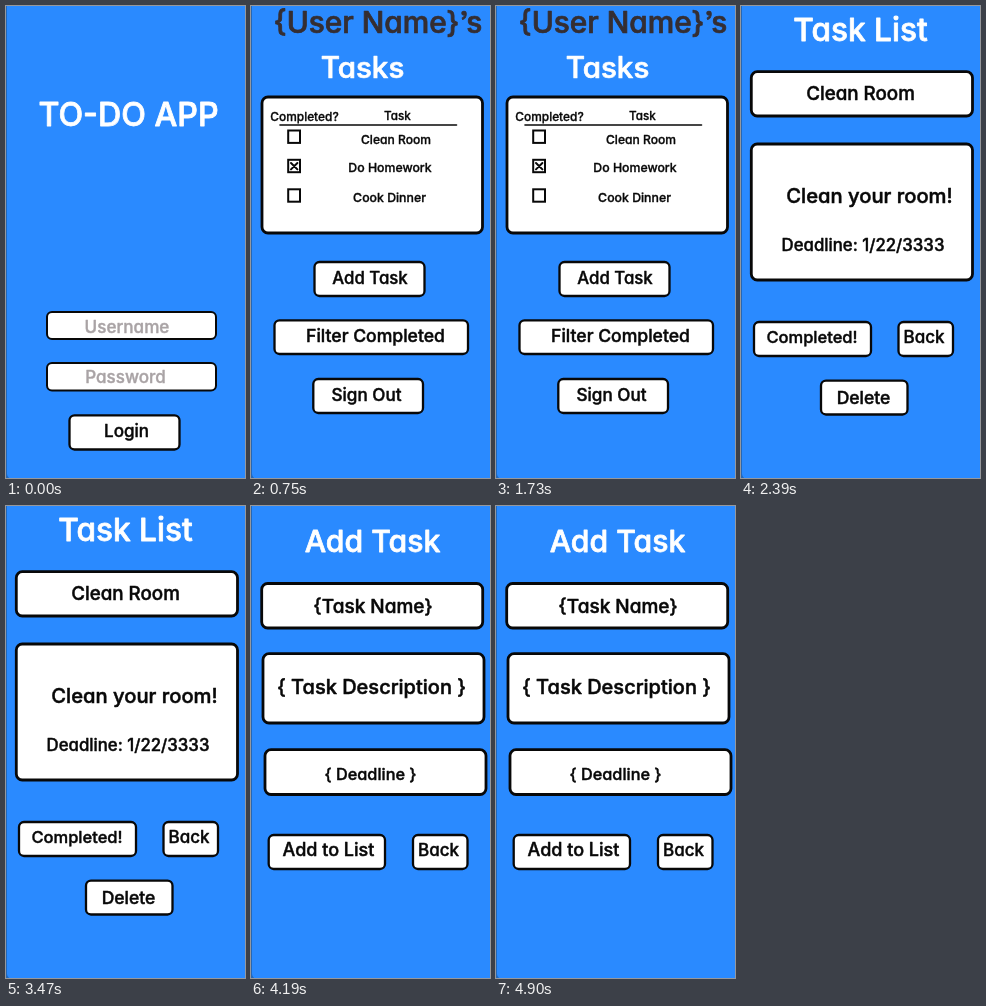
Animation of 239x472 px, one loop 5380 ms. Source, as an HTML page:

```html
<!DOCTYPE html>
<html lang="en">
<head>
<meta charset="utf-8">
<title>To-do app</title>
<style>
  html, body { margin: 0; width: 100%; height: 100%; overflow: hidden; background: #2a8aff; }
  svg { display: block; width: 239px; height: 472px; }
  text {
    font-family: Inter, "Noto Sans", sans-serif;
    font-weight: 500;
    font-feature-settings: "cv11", "ss03";
    text-anchor: middle;
    white-space: pre;
    stroke-linejoin: round;
  }
</style>
</head>
<body>
<svg id="stage" viewBox="0 0 239 472"></svg>
<script>
const INK = "#080808", WHITE = "#fff", GREY = "#a9a3a5", BROWN = "#352e32";
const LOOP = 5380;
const stage = document.getElementById("stage");

function add(parent, tag, attrs, content = "") {
  const node = document.createElementNS("http://www.w3.org/2000/svg", tag);
  for (const key in attrs) node.setAttribute(key, attrs[key]);
  node.textContent = content;
  parent.append(node);
  return node;
}

// Boxes are given by the centre lines of their edges.
const box = (x1, y1, x2, y2, line = 2, r = 5) => g => add(g, "rect", {
  x: x1, y: y1, width: x2 - x1, height: y2 - y1, rx: r,
  fill: WHITE, stroke: INK, "stroke-width": line
});
const card = (x1, y1, x2, y2) => box(x1, y1, x2, y2, 2.8, 6);
const label = (content, x, y, size, color = INK) => g => add(g, "text", {
  x, y, "font-size": size, fill: color, stroke: color, "stroke-width": size * 0.025
}, content);
const stroke = (d, width) => g => add(g, "path", {
  d, fill: "none", stroke: INK, "stroke-width": width, "stroke-linecap": "round"
});
const check = y => box(37.2, y, 49, y + 12.4, 2, 0);

const screens = [
  { start: 0, parts: [
    label("TO-DO APP", 122.5, 119.5, 32.2, WHITE),
    box(41, 306, 210, 333),
    label("Username", 121, 327, 17.1, GREY),
    box(41, 357, 210, 384.5),
    label("Password", 119.5, 377, 17, GREY),
    box(63.5, 409.3, 173.5, 443.5, 2.3),
    label("Login", 120.5, 430.5, 17)
  ] },
  { start: 750, parts: [
    label("{User Name}’s", 127, 27, 29.8, BROWN),
    label("Tasks", 111.5, 72, 29.6, WHITE),
    card(11, 91, 231.5, 227),
    label("Completed?", 53.5, 114.5, 11.9),
    label("Task", 146.5, 113.5, 11.7),
    stroke("M29 119H205.5", 1.6),
    check(124.5), check(153.8), check(183.3),
    stroke("M40 157L46.4 163.4M46.4 157L40 163.4", 2),
    label("Clean Room", 145, 138, 12.1),
    label("Do Homework", 139, 166, 12.3),
    label("Cook Dinner", 138.5, 195.5, 12.3),
    box(63.5, 256, 173.5, 290, 2.3),
    label("Add Task", 119, 277.5, 16.8),
    box(23.5, 314.3, 217, 348, 2.3),
    label("Filter Completed", 124.5, 335.5, 17.6),
    box(62.3, 373, 172, 407, 2.3),
    label("Sign Out", 115.5, 394.5, 17.1)
  ] },
  { start: 2390, parts: [
    label("Task List", 119.5, 34.5, 31.6, WHITE),
    card(10.3, 65.7, 231.5, 110),
    label("Clean Room", 119.5, 94, 18.8),
    card(10.3, 138, 231.5, 274),
    label("Clean your room!", 128.5, 197, 20.2),
    label("Deadline: 1/22/3333", 122, 244.5, 16.8),
    box(13, 316, 130, 350, 2.3),
    label("Completed!", 71, 337, 16.5),
    box(157.5, 316, 212, 350, 2.3),
    label("Back", 183, 337, 17),
    box(80, 374.7, 166.5, 408.5, 2.3),
    label("Delete", 122.5, 397.5, 17.5)
  ] },
  { start: 4190, parts: [
    label("Add Task", 121.5, 46, 30.2, WHITE),
    card(10.7, 77.5, 231.7, 122),
    label("{Task Name}", 122, 107, 19),
    card(12, 147.7, 233, 217),
    label("{ Task Description }", 120.5, 188, 20),
    card(14, 243.7, 235, 288.5),
    label("{ Deadline }", 119.5, 273.5, 16.3),
    box(17.7, 329, 134, 363, 2.3),
    label("Add to List", 77.5, 350, 18),
    box(162, 329, 216.5, 363, 2.3),
    label("Back", 187.5, 350, 17)
  ] }
];

add(stage, "rect", { width: 239, height: 472, fill: "#2a8aff" });
add(stage, "path", { d: "M0 0H1V468Q1 470 3 472H0Z", fill: "#2467b5" });

screens.forEach(({ start, parts }, i) => {
  const group = add(stage, "g", { opacity: 0 });
  parts.forEach(draw => draw(group));
  const end = screens[i + 1]?.start ?? LOOP;
  const steps = [[0, +(start === 0)], [start, 1], [end, 0], [LOOP, 0]];
  group.animate(
    steps.map(([time, opacity]) => ({ offset: time / LOOP, opacity, easing: "step-end" })),
    { duration: LOOP, iterations: Infinity }
  );
});
</script>
</body>
</html>
```
